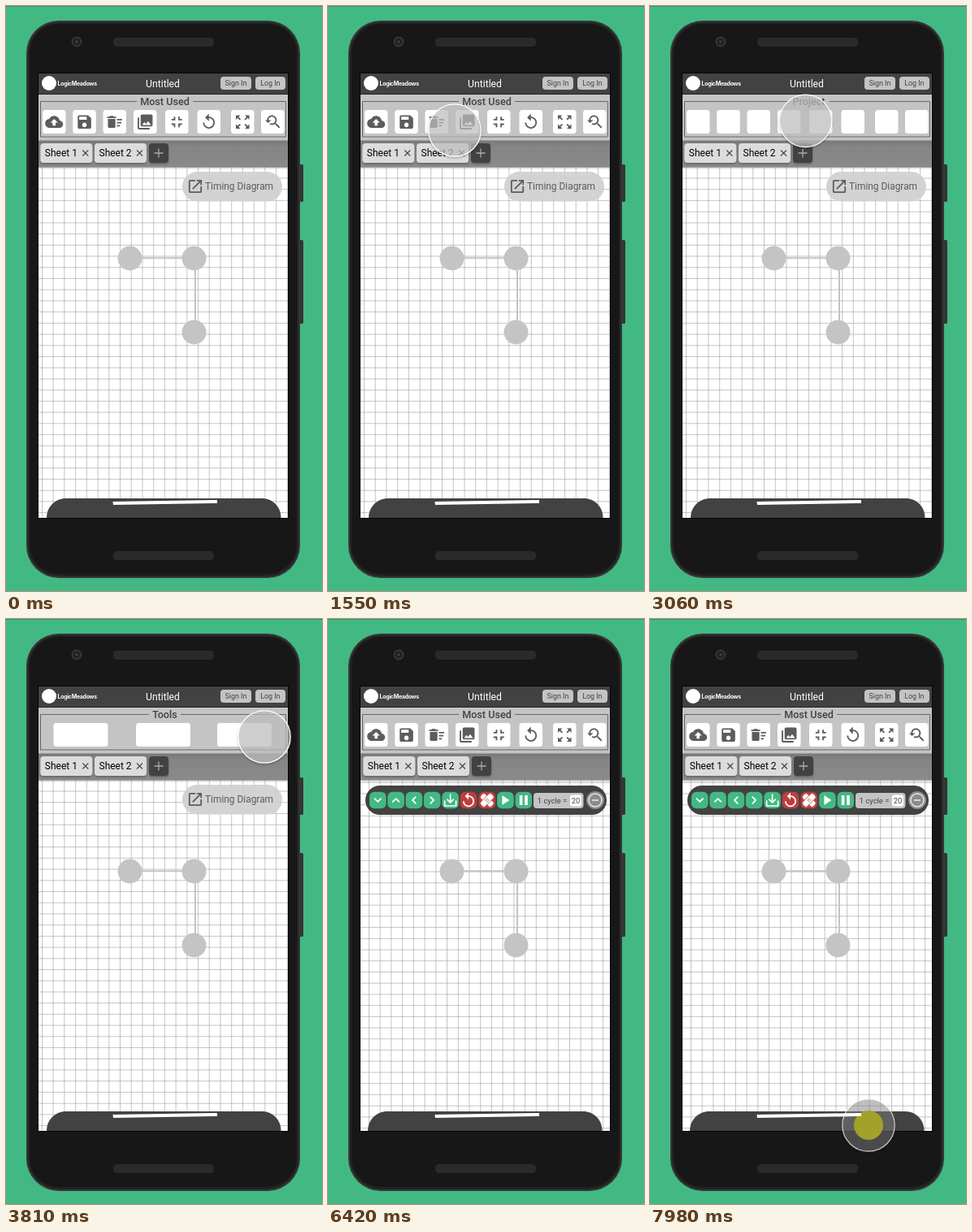
Recreate the animation shown at these times as an HTML page. Size 389 by 720 pixels, loop 8 s.

```html
<!DOCTYPE html>
<html lang="en">
<head>
<meta charset="utf-8">
<style>
  html, body { margin: 0; width: 100%; height: 100%; overflow: hidden; background: #42b983; }
  svg { display: block; width: 389px; height: 720px; font-family: Roboto, sans-serif; }
</style>
</head>
<body>
<svg id="stage" viewBox="0 0 389 720"></svg>
<script>
const LOOP = 8000;
const GREEN = '#42b983', RED = '#bf3d3d', DARK = '#424242', GREY = '#c4c4c4';

const icons = {
  upload: 'M19.35 10.04C18.67 6.59 15.64 4 12 4 9.11 4 6.6 5.64 5.35 8.04 2.34 8.36 0 10.91 0 14c0 3.31 2.69 6 6 6h13c2.76 0 5-2.24 5-5 0-2.64-2.05-4.78-4.65-4.96zM14 13v4h-4v-4H7l5-5 5 5z',
  save: 'M17 3H5c-1.11 0-2 .9-2 2v14c0 1.1.89 2 2 2h14c1.1 0 2-.9 2-2V7zm-5 16c-1.66 0-3-1.34-3-3s1.34-3 3-3 3 1.34 3 3-1.34 3-3 3zm3-10H5V5h10z',
  sweep: 'M15 16h4v2h-4zm0-8h7v2h-7zm0 4h6v2h-6zM3 18c0 1.1.9 2 2 2h6c1.1 0 2-.9 2-2V8H3zM14 5h-3l-1-1H6L5 5H2v2h12z',
  photos: 'M22 16V4c0-1.1-.9-2-2-2H8c-1.1 0-2 .9-2 2v12c0 1.1.9 2 2 2h12c1.1 0 2-.9 2-2zm-11-4l2.03 2.71L16 11l4 5H8zM2 6v14c0 1.1.9 2 2 2h14v-2H4V6z',
  shrink: 'M5 16h3v3h2v-5H5zm3-8H5v2h5V5H8zm6 11h2v-3h3v-2h-5zm2-11V5h-2v5h5V8z',
  replay: 'M12 5V1L7 6l5 5V7c3.31 0 6 2.69 6 6s-2.69 6-6 6-6-2.69-6-6H4c0 4.42 3.58 8 8 8s8-3.58 8-8-3.58-8-8-8z',
  expand: 'M15 3l2.3 2.3-2.89 2.87 1.42 1.42L18.7 6.7 21 9V3zM3 9l2.3-2.3 2.87 2.89 1.42-1.42L6.7 5.3 9 3H3zm6 12l-2.3-2.3 2.89-2.87-1.42-1.42L5.3 17.3 3 15v6zm12-6l-2.3 2.3-2.87-2.89-1.42 1.42 2.89 2.87L15 21h6z',
  search: 'M17 14h-.8l-.27-.27c.98-1.14 1.57-2.61 1.57-4.23 0-3.59-2.9-6.5-6.5-6.5s-6.5 3-6.5 6.5H2l3.84 4 4.16-4H6.5C6.5 7 8.5 5 11 5s4.5 2 4.5 4.5S13.5 14 11 14c-.65 0-1.26-.14-1.82-.38L7.7 15.1c.97.57 2.1.9 3.3.9 1.6 0 3.08-.6 4.22-1.57l.27.27v.8l5 5L22 19z',
  open: 'M19 19H5V5h7V3H5c-1.11 0-2 .9-2 2v14c0 1.1.89 2 2 2h14c1.1 0 2-.9 2-2v-7h-2zM14 3v2h3.59l-9.83 9.83 1.41 1.41L19 6.41V10h2V3z'
};

const rect = (x, y, w, h, r, fill, extra = '') =>
  `<rect x="${x}" y="${y}" width="${w}" height="${h}" rx="${r}" fill="${fill}" ${extra}/>`;
const dot = (x, y, r, fill, extra = '') => `<circle cx="${x}" cy="${y}" r="${r}" fill="${fill}" ${extra}/>`;
const line = (d, color, width, extra = '') =>
  `<path d="${d}" fill="none" stroke="${color}" stroke-width="${width}" ${extra}/>`;
const text = (x, y, size, str, fill, extra = '') =>
  `<text x="${x}" y="${y}" font-size="${size}" fill="${fill}" ${extra}>${str}</text>`;
const icon = (name, cx, cy, scale, fill) =>
  `<path d="${icons[name]}" fill="${fill}" transform="translate(${cx} ${cy}) scale(${scale}) translate(-12 -12)"/>`;
const mid = 'text-anchor="middle"';

function phone() {
  return rect(360, 195, 6, 46, 1.5, '#353535') + rect(360, 288, 6, 103, 1.5, '#353535') +
    rect(25, 18, 337, 686, 40, '#363636') +
    rect(27, 20, 333, 682, 38, '#222') +
    rect(29, 22, 329, 677, 36, '#171717') +
    rect(132, 39, 124, 11, 4.5, '#2a2a2a') + rect(132, 671, 124, 11, 4.5, '#2a2a2a') +
    dot(87, 44, 6.5, '#343434') + dot(87, 44, 4, '#1e1e1e') + dot(87, 44, 2, '#3a3a3a') +
    rect(39, 82, 309, 549, 0, '#050505');
}

function header() {
  return rect(40, 83, 307, 25.5, 0, DARK) + dot(53, 95, 9, '#fff') +
    text(63.5, 97.5, 7, 'LogicMeadows', '#fff', 'font-weight="700" font-family="Inter, sans-serif" letter-spacing="-.3"') +
    text(193, 100, 12.2, 'Untitled', '#fff', mid) +
    rect(264, 87, 38, 16, 4, GREY) + text(283, 98, 8.9, 'Sign In', DARK, mid) +
    rect(307, 87, 37, 16, 4, GREY) + text(325.3, 98, 8.9, 'Log In', DARK, mid);
}

function grid() {
  let d = '';
  for (let x = 30.78; x < 347; x += 13.72) d += `M${x.toFixed(1)} 180V630`;
  for (let y = 198.28; y < 630; y += 13.72) d += `M30 ${y.toFixed(1)}H350`;
  return rect(40, 198, 307, 432, 0, '#fff') +
    `<g clip-path="url(#canvas)">${line(d, '#9c9c9c', .6, 'id="grid"')}</g>`;
}

function toolbar(id, title, gap, xs, width, names = []) {
  const [left, right] = [195.5 - gap, 195.5 + gap];
  return `<g id="${id}">` +
    line(`M${left} 117.5H42.5V161H344.5V117.5H${right}`, '#666', 1) +
    text(195.5, 122, 12.6, title, DARK, mid + ' font-weight="500"') +
    xs.map((x, i) => rect(x, 128, width, 29, 3.5, '#fff') +
      (names[i] ? icon(names[i], x + width / 2, 142.7, .92, '#5c5c5c') : '')).join('') + '</g>';
}

function tabs() {
  const tab = (x, label) =>
    rect(x, 169, 64, 24, 4, '#dcdcdc', 'filter="url(#soft)"') + text(x + 5.5, 185.3, 12, label, '#000') +
    line(`M${x + 52} 177.5l7 7m0-7l-7 7`, '#444', 1.1);
  return '<g id="tabs">' + tab(42.3, 'Sheet 1') + tab(109, 'Sheet 2') +
    rect(176, 169, 24, 24, 4, DARK, 'filter="url(#soft)"') +
    line('M182.5 181h11m-5.5-5.5v11', '#aaa', 1.3) + '</g>';
}

function circuit() {
  return line('M152 310.3H232.5M233 310V402', GREY, 2) +
    [[152.5, 310.5], [231.5, 310.5], [231.5, 401.5]].map(([x, y]) => dot(x, y, 15, GREY)).join('');
}

function timingButton() {
  return '<g id="closed">' + rect(217, 204, 123, 36.5, 18.2, '#d2d2d2', 'opacity=".96"') +
    icon('open', 233, 222, .9, '#5c5c5c') + text(245, 226.3, 11.9, 'Timing Diagram', '#5c5c5c') + '</g>';
}

function timingPanel() {
  const round = 'stroke-linecap="round" stroke-linejoin="round"';
  const key = (cx, fill, art) =>
    `<g transform="translate(${cx} 223)">${rect(-10.3, -10.2, 20.6, 20.4, 6, fill)}${art}</g>`;
  const chevron = angle =>
    line('M-3.8 -1.9L0 1.9L3.8 -1.9', '#fff', 1.8, `${round} transform="rotate(${angle})"`);
  const strip = rect(-9.3, -3.9, 18.6, 7.8, 2.4, '#fff', `stroke="${RED}" stroke-width=".8"`);
  const holes = [[-1.5, 0], [1.5, 0], [0, -1.5], [0, 1.5]].map(([x, y]) => dot(x, y, .65, RED)).join('');
  return '<g id="opened">' + rect(46, 205, 297, 36, 18, DARK) +
    [0, 180, 90, -90].map((a, i) => key(61.3 + 22.3 * i, GREEN, chevron(a))).join('') +
    key(150.6, GREEN, line('M-7 1V7H7V1M0 -7V3M-3.8 -.8L0 3L3.8 -.8', '#fff', 1.7, round)) +
    key(173, RED, icon('replay', 0, .4, .88, '#fff')) +
    key(195.8, RED, `<g transform="rotate(45)">${strip}</g><g transform="rotate(-45)">${strip}</g>${holes}`) +
    key(218.4, GREEN, '<path d="M-4 -6V6L5 0Z" fill="#fff"/>') +
    key(240.8, GREEN, rect(-5, -6, 3.6, 12, 0, '#fff') + rect(1.4, -6, 3.6, 12, 0, '#fff')) +
    rect(253, 214, 61.5, 19, 4, GREY) + text(257.8, 226.8, 9.4, '1 cycle =', DARK) +
    rect(298, 216.5, 14, 14, 2.5, '#fff') + text(305, 227, 9.4, '20', DARK, mid) +
    dot(329, 223, 11, '#8c8c8c') + dot(329, 223, 8, 'none', 'stroke="#e8e8e8" stroke-width="1.5"') +
    line('M325 223h8', '#e8e8e8', 1.6) + '</g>';
}

const drawer = `<path id="drawer" d="M50 630C50 616 61 606 74 606H315C328 606 338.5 616 338.5 630Z" fill="${DARK}"/>`;
const handle = '<path d="M131.5 610L260 608V612L132 614Z" fill="#fff"/>';

document.getElementById('stage').innerHTML = `
  <defs>
    <linearGradient id="strip" x2="0" y2="1">
      <stop stop-color="#777"/><stop offset=".25" stop-color="#858585"/><stop offset="1" stop-color="#8a8a8a"/>
    </linearGradient>
    <clipPath id="canvas"><rect x="40" y="198" width="307" height="432"/></clipPath>
    <filter id="soft" x="-30%" y="-30%" width="160%" height="160%">
      <feDropShadow dx="0" dy="1.5" stdDeviation="1.3" flood-opacity=".3"/>
    </filter>
  </defs>` +
  rect(0, 0, 389, 720, 0, GREEN) + rect(0, 0, 389, 1, 0, '#35946a') + phone() + grid() + header() +
  rect(40, 165, 307, 33.5, 0, 'url(#strip)') + rect(40, 198.5, 307, 2, 0, '#000', 'opacity=".12"') +
  rect(40, 109, 307, 56.5, 0, GREY) +
  toolbar('used', 'Most Used', 34.5, [45, 82.3, 119.5, 157, 196, 235.5, 277, 314], 28.5,
    ['upload', 'save', 'sweep', 'photos', 'shrink', 'replay', 'expand', 'search']) +
  toolbar('project', 'Project', 25, [45, 82.3, 119.5, 157, 196, 235.5, 277, 314], 28.5) +
  toolbar('tools', 'Tools', 19.5, [58.5, 160, 260], 67) +
  toolbar('circuit', 'Circuit', 24, [54, 103.2, 153, 203, 252.5, 304], 28.7) +
  tabs() + circuit() + timingButton() + timingPanel() + drawer +
  `<g id="cursor" filter="url(#soft)">
    <circle id="halo" r="32.2" stroke="#fff" stroke-width="1.2"/>
    <circle id="tap" fill="#a3a12a"/>
  </g>` + handle;

const $ = id => document.getElementById(id);
const show = (id, on) => $(id).style.display = on ? '' : 'none';
const move = (id, x, y = 0) => $(id).setAttribute('transform', `translate(${x.toFixed(2)} ${y.toFixed(2)})`);

// Cursor trips: [time, x, y] stops, hidden outside each trip.
const trips = [
  [[255, 343, 658], [470, 234, 187], [780, 234, 187], [800, 238, 178], [900, 238, 178], [1200, 298, 162],
   [1290, 298, 158], [1550, 156, 153], [1630, 156, 153], [1700, 157, 153], [2040, 157, 153], [2430, 302, 148],
   [2490, 302, 148], [2650, 311, 143], [2795, 311, 143], [3120, 165, 141], [3440, 165, 141], [3810, 318, 145],
   [4205, 318, 145], [4390, 118, 165], [4865, 118, 165], [5040, -8, 358]],
  [[6715, 298, 742], [6790, 292, 699], [6910, 282, 660.5], [7120, 274, 636], [7520, 269, 623], [LOOP, 269, 623]]
];

function place(t) {
  const trip = trips.find(stops => t >= stops[0][0] && t < stops.at(-1)[0]);
  if (!trip) return null;
  const i = trip.findIndex(stop => stop[0] > t);
  const [a, b] = [trip[i - 1], trip[i]];
  const k = (t - a[0]) / (b[0] - a[0]);
  return [a[1] + (b[1] - a[1]) * k, a[2] + (b[2] - a[2]) * k];
}

function draw(t) {
  const active = t < 1630 || t >= 6420 ? 'used' : t < 3160 ? 'project' : t < 4570 ? 'tools' : 'circuit';
  ['used', 'project', 'tools', 'circuit'].forEach(id => show(id, id === active));
  const open = t >= 6420;
  show('closed', !open);
  show('opened', open);
  move('tabs', open ? 1 : 0);
  move('drawer', open ? -1 : 0);
  move('grid', open ? 6 : 0, open ? 3 : 0);

  const at = place(t);
  show('cursor', at);
  if (at) move('cursor', ...at);
  const pressed = t >= 7930;
  const halo = $('halo');
  halo.setAttribute('fill', pressed ? '#8a8a8a' : GREY);
  halo.setAttribute('fill-opacity', pressed ? .42 : .66);
  halo.setAttribute('stroke-opacity', pressed ? .7 : 1);
  $('tap').setAttribute('r', !pressed ? 0 : t < 7975 ? 10 : 18);
}

const start = performance.now();
function tick() {
  draw((performance.now() - start) % LOOP);
  requestAnimationFrame(tick);
}
tick();
</script>
</body>
</html>
```
